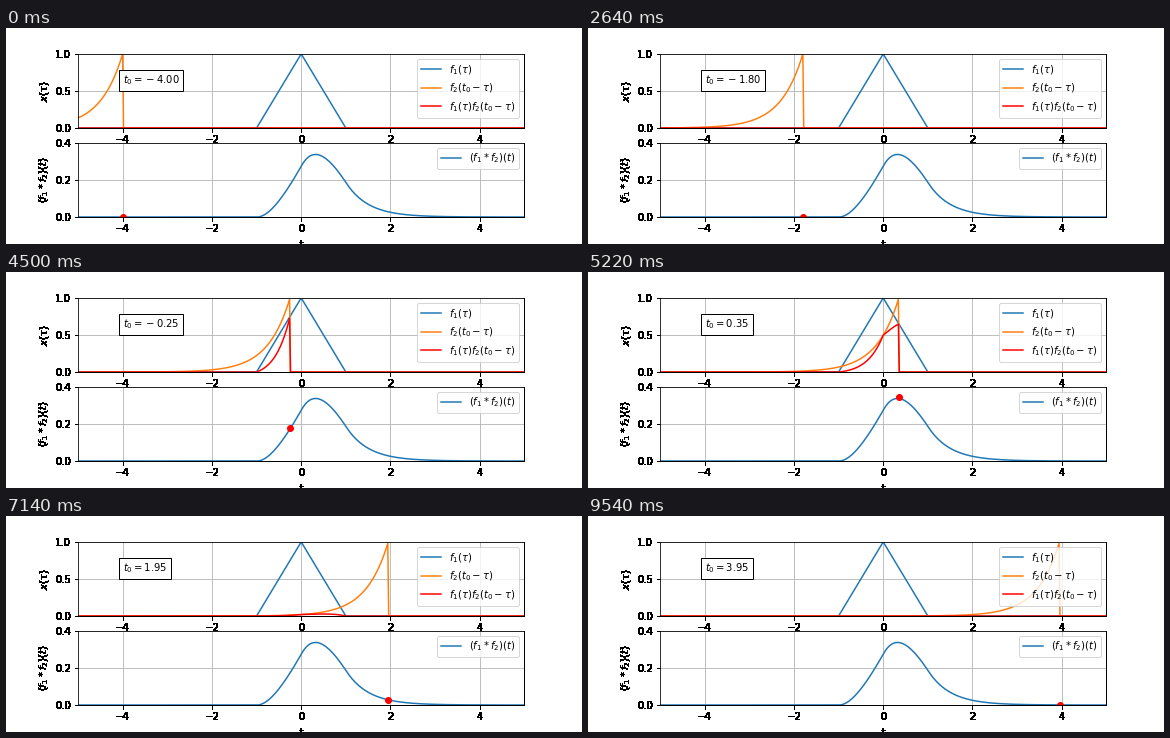
A matplotlib script for the animation above (9600 ms loop, 576 px wide and 216 px high).

```python
import numpy as np
import matplotlib.pyplot as plt
from matplotlib.animation import FuncAnimation

plt.rcParams.update({"font.family": "DejaVu Sans", "font.size": 10})

STEP = 1 / 50
t = np.arange(-5, 5, STEP)
shifts = np.arange(-4, 4, 0.05)


def triangle(x):
    return np.maximum(1 - np.abs(x), 0)


def decay(x):
    return (x > 0) * np.exp(-2 * np.abs(x))


def product(t0):
    return triangle(t) * decay(t0 - t)


def overlap(t0):
    return product(t0).sum() * STEP


def style_axes(ax, top, ylabel):
    ax.set_xlim(-5, 5)
    ax.set_ylim(0, top)
    ax.set_xticks(range(-4, 5, 2))
    ax.set_yticks([0, top / 2, top])
    ax.set_ylabel(ylabel)
    ax.grid(True)


def add_hard_edges(fig):
    """Put a backdrop behind the axes where soft edges of outer ink are solid."""
    fig.set_facecolor((1, 1, 1, 0))
    fig.canvas.draw()
    rgba = np.array(fig.canvas.buffer_rgba())
    inked = rgba[..., 3:] > 0
    backdrop = np.where(inked, rgba[..., :3], 255).astype(np.uint8)
    fig.set_facecolor("white")
    fig.figimage(backdrop, zorder=-1)


fig, (ax_in, ax_out) = plt.subplots(2, 1, figsize=(8, 3), dpi=72)
fig.subplots_adjust(left=0.125, right=0.9, bottom=0.125, top=0.88, hspace=0.2)
style_axes(ax_in, 1.0, r"$x(\tau)$")
style_axes(ax_out, 0.4, r"$(f_1*f_2)(t)$")
ax_out.set_xlabel("$t$")
add_hard_edges(fig)

ax_in.plot(t, triangle(t), label=r"$f_1(\tau)$")
shifted, = ax_in.plot(t, decay(shifts[0] - t), label=r"$f_2(t_0-\tau)$")
prod_line, = ax_in.plot(t, product(shifts[0]), "r-",
                        label=r"$f_1(\tau)f_2(t_0-\tau)$")
ax_in.legend(fontsize=10, loc="upper right")
readout = ax_in.text(-4, 0.6, "", bbox=dict(facecolor="white"))

ax_out.plot(t, [overlap(x) for x in t], label="$(f_1*f_2)(t)$")
dot, = ax_out.plot([], [], "ro")
ax_out.legend(fontsize=10, loc="upper right")


def update(i):
    t0 = shifts[i]
    shifted.set_ydata(decay(t0 - t))
    prod_line.set_ydata(product(t0))
    # avoid a signed zero in the readout
    readout.set_text(f"$t_0={round(t0, 2) + 0.0:.2f}$")
    dot.set_data([t0], [overlap(t0)])
    return shifted, prod_line, readout, dot


anim = FuncAnimation(fig, update, frames=len(shifts), interval=60,
                     repeat=True, repeat_delay=0)
plt.show()
```
